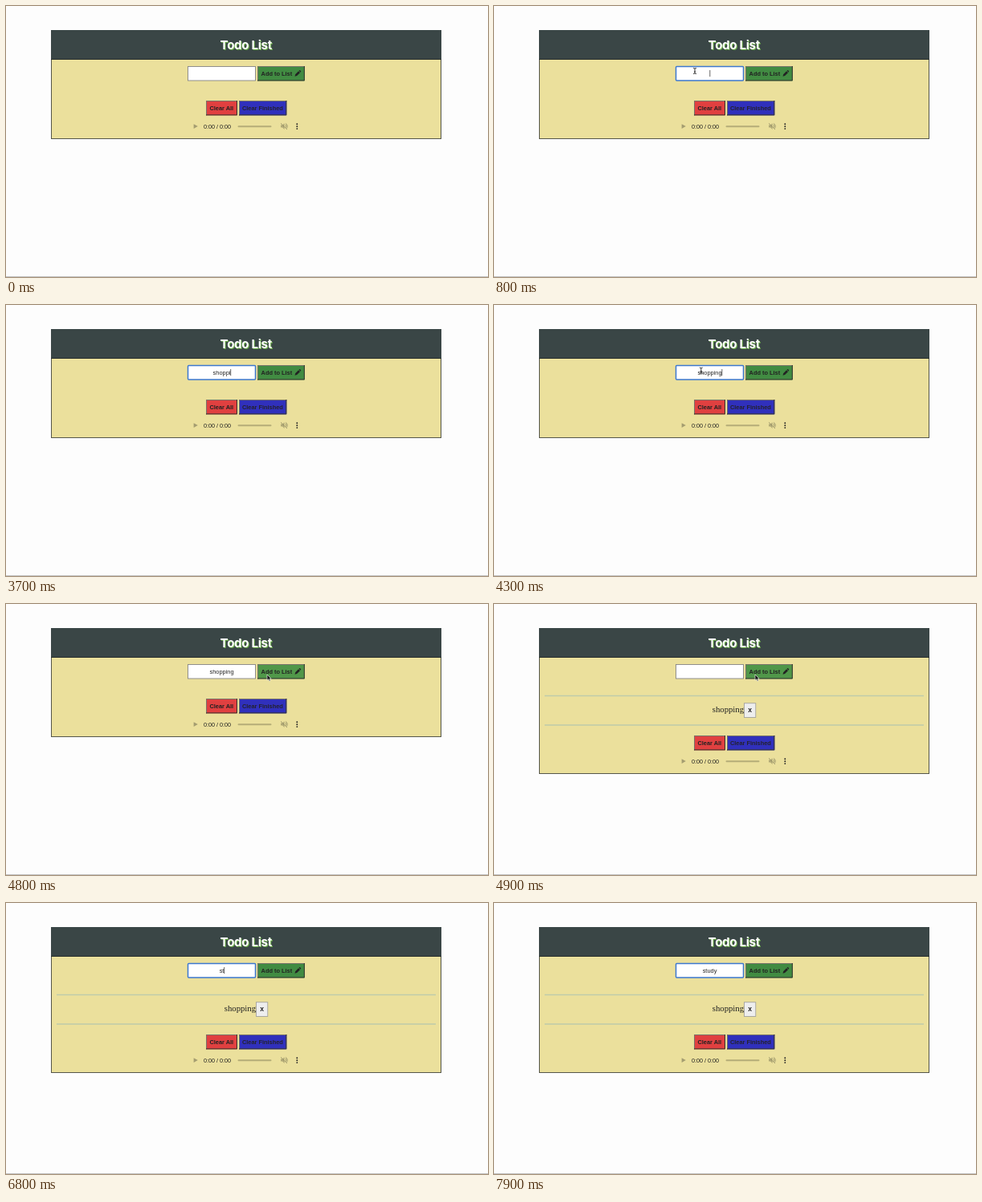
These frames come from a looping animation (600x338 px, 8 s). An HTML page:

```html
<!DOCTYPE html>
<html lang="en">
<head>
<meta charset="utf-8">
<title>Todo List</title>
<style>
html, body { margin: 0; width: 100%; height: 100%; overflow: hidden; background: #fdfdfd; }
svg { display: block; width: 100vw; height: 100vh; }
text { font: 7.4px "Liberation Sans", Arial, sans-serif; fill: #222; white-space: pre; }
.middle { text-anchor: middle; }
.bold { font-weight: bold; }
.title { font: bold 15px Inter, sans-serif; letter-spacing: -.25px; }
.item { font: 10.7px "Liberation Serif", Times, serif; }
.menu { font: 7px Inter, sans-serif; fill: #eee; }
</style>
</head>
<body>
<svg viewBox="0 0 600 338">
  <rect width="600" height="338" fill="#fdfdfd"/>
  <path d="M0 337.5H600" stroke="#c4c4c4"/>
  <rect id="panel" x="56.5" y="30.5" width="485" height="135" fill="#ebe09c" stroke="#55564a"/>
  <path d="M56 30H542V67H56Z" fill="#3a4646"/>
  <path d="M56 66.5H542" stroke="#252c2b"/>
  <text class="title middle" x="299.8" y="55" style="fill:#70b34c">Todo List</text>
  <text class="title middle" x="298.8" y="54" style="fill:#fff">Todo List</text>

  <rect id="field" x="226.5" y="75.5" width="84" height="17.5" fill="#fff"/>
  <text id="typed" class="middle" x="268.5" y="86.6"></text>
  <path id="caret" stroke="#222" stroke-width=".7"/>

  <g id="add">
    <text class="bold" x="317.6" y="86.6">Add to List</text>
    <path d="M359.5 87.8L360.2 85.2L364.1 81.3L366 83.2L362.1 87.1ZM364.6 80.8L365.2 80.2Q365.8 79.8 366.4 80.4L366.9 80.9Q367.5 81.5 367 82.1L366.5 82.7Z" fill="#222"/>
  </g>

  <g id="list">
    <path d="M63 114.5H535M63 151H535" stroke="#bfcbaa" stroke-width="1.4"/>
    <text class="item" x="271.8" y="135.3">shopping</text>
    <rect x="311.5" y="123.8" width="14.3" height="17.6" fill="#eee" stroke="#999" stroke-width=".8"/>
    <text class="bold middle" x="318.7" y="134.8" style="font-size:8.5px">x</text>
  </g>

  <g id="footer">
    <g id="clearAll"><text class="bold middle" x="268.3" y="129.7">Clear All</text></g>
    <g id="clearDone"><text class="bold middle" x="319.4" y="129.7" style="fill:#24222e">Clear Finished</text></g>
    <path d="M233.6 147.2L238.8 150.1L233.6 153Z" fill="#a49d70"/>
    <text x="246" y="152.7" style="font-size:7.2px">0:00 / 0:00</text>
    <path d="M289.5 150.2H329.5" stroke="#b5ad78" stroke-width="2" stroke-linecap="round"/>
    <path d="M342 148.6H344L346.6 146.3V153.9L344 151.6H342Z" fill="#b1a976"/>
    <path d="M342 146.3L350 154M348 147.9Q349.4 150 348.2 151.6M348.4 146.4Q351.5 149 349.8 152.4" fill="none" stroke="#8f8962" stroke-width=".8"/>
    <path d="M362.3 147.3v0M362.3 150.2v0M362.3 153.1v0" stroke="#222" stroke-width="1.9" stroke-linecap="round"/>
  </g>

  <g id="popup">
    <path d="M264 98.2L268.4 94L272.8 98.2H285.5Q288 98.2 288 100.7V136Q288 138.5 285.5 138.5H260Q257.5 138.5 257.5 136V100.7Q257.5 98.2 260 98.2Z" fill="#202223"/>
    <text class="menu" x="263.7" y="111.6">d</text>
    <text class="menu" x="263.7" y="130">cool</text>
  </g>

  <path id="arrow" d="M0 0V7.2L1.7 5.7L2.8 8.2L4.1 7.6L3 5.2H5.2Z" fill="#111" stroke="#fff" stroke-width=".6"/>
  <path id="beam" d="M-1.9 -3.6Q0 -3.6 0 -2.6Q0 -3.6 1.9 -3.6M0 -2.7V2.7M-1.9 3.6Q0 3.6 0 2.6Q0 3.6 1.9 3.6M-1 1H1" fill="none" stroke="#222" stroke-width=".9"/>
</svg>
<script>
const LOOP = 8000;
const INSERT_AT = 4900;
const LIST_HEIGHT = 46;
const $ = id => document.getElementById(id);
const show = (id, on) => $(id).setAttribute('visibility', on ? 'visible' : 'hidden');
const set = (id, attrs) => {
  for (const name in attrs) $(id).setAttribute(name, attrs[name]);
};
const between = (t, from, to) => t >= from && t < to;

// Prepends the face and bevel of an outset button; returns its face.
function bevel(id, x, y, w, h, fill) {
  const r = x + w, b = y + h;
  $(id).insertAdjacentHTML('afterbegin', `
    <rect x="${x}" y="${y}" width="${w}" height="${h}" fill="${fill}"/>
    <path d="M${x + .5} ${b}V${y + .5}H${r}" fill="none" stroke="#77746a"/>
    <path d="M${x} ${b - .5}H${r - .5}V${y}" fill="none" stroke="#35342f"/>`);
  return $(id).firstElementChild;
}
const addFace = bevel('add', 313, 75, 58.8, 18.4, '#418b42');
bevel('clearAll', 249, 118, 39, 18.4, '#e04040');
bevel('clearDone', 290, 118, 59.3, 18.4, '#3030bc');

// Key times for each typed character.
const words = [
  { text: 'shopping', keys: [2000, 3000, 3300, 3400, 3500, 3700, 3800, 3900], end: INSERT_AT },
  { text: 'study', keys: [6400, 6700, 6900, 7200, 7400], end: LOOP }
];
function typedAt(t) {
  const word = words.find(w => t < w.end);
  return word.text.slice(0, word.keys.filter(k => k <= t).length);
}

// Pointer stops: time, x, y.
const trips = [
  { from: 300, to: 2000, stops: [[300, 296, 143], [600, 250, 81]] },
  { from: 4200, to: 6400, stops: [[4200, 250, 81], [4700, 325, 88], [5000, 325, 88], [5400, 274.5, 84.3]] }
];
function pointerAt(t) {
  const trip = trips.find(p => between(t, p.from, p.to));
  if (!trip) return null;
  const next = trip.stops.findIndex(s => s[0] > t);
  if (next < 0) return trip.stops.at(-1).slice(1);
  const [t0, x0, y0] = trip.stops[next - 1], [t1, x1, y1] = trip.stops[next];
  const u = (t - t0) / (t1 - t0), k = u * u * (3 - 2 * u);
  return [x0 + (x1 - x0) * k, y0 + (y1 - y0) * k];
}

function draw(t) {
  const listed = t >= INSERT_AT;
  show('list', listed);
  set('panel', { height: listed ? 135 + LIST_HEIGHT : 135 });
  set('footer', { transform: `translate(0 ${listed ? LIST_HEIGHT : 0})` });

  const focused = between(t, 600, 4700) || t >= 5400;
  set('field', { stroke: focused ? '#3d78cf' : '#858585', 'stroke-width': focused ? 1.5 : .9, rx: focused ? 1 : 0 });
  $('typed').textContent = typedAt(t);
  const caretX = 268.5 + $('typed').getComputedTextLength() / 2 + .3;
  set('caret', { d: `M${caretX} 80V88.2` });
  show('caret', focused && !between(t, 1100, 1300) && !between(t, 5700, 6400) && t < 7900);
  show('popup', between(t, 5800, 6400));

  const pointer = pointerAt(t);
  const [x, y] = pointer || [0, 0];
  const inField = between(x, 226, 311) && between(y, 75, 93);
  const onAdd = between(x, 313, 372) && between(y, 75, 93);
  addFace.setAttribute('fill', onAdd ? '#509749' : '#418b42');
  for (const id of ['arrow', 'beam']) set(id, { transform: `translate(${x} ${y})` });
  show('arrow', pointer && !inField);
  show('beam', pointer && inField);
}

function frame(now) {
  draw(Math.floor(now % LOOP / 100) * 100);
  requestAnimationFrame(frame);
}
draw(0);
requestAnimationFrame(frame);
</script>
</body>
</html>
```
